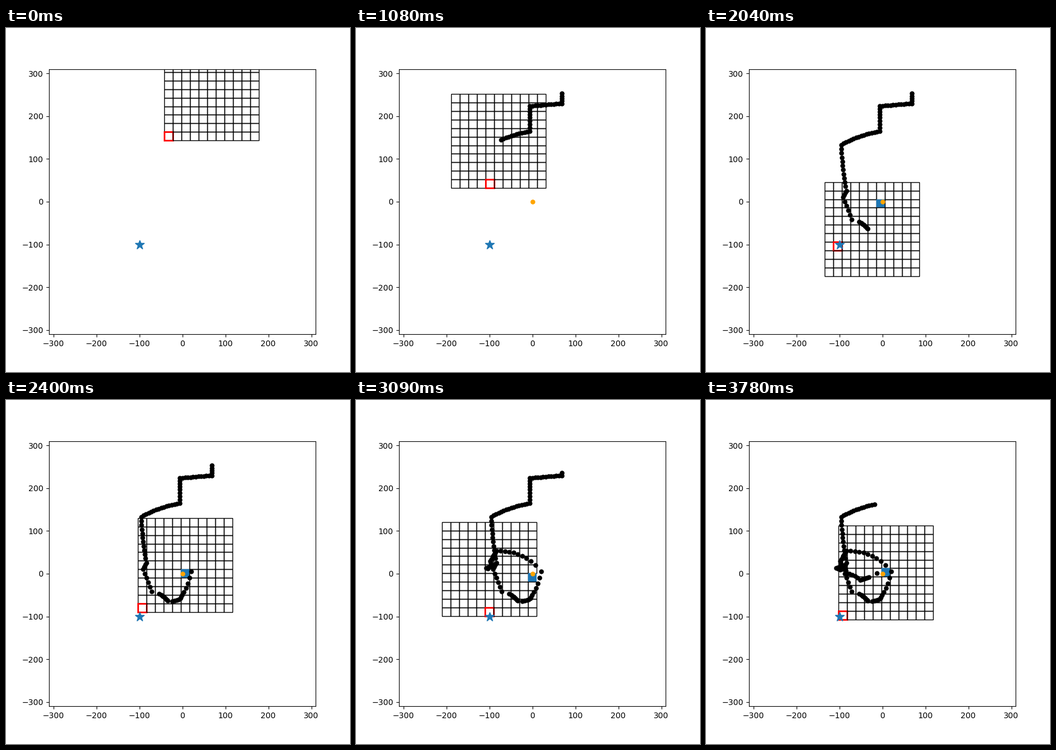
A matplotlib script for the animation above (3.81 s loop, 600 by 600 pixels).

```python
import matplotlib.pyplot as plt
import numpy as np
from matplotlib.animation import FuncAnimation
from matplotlib.patches import Rectangle

FRAMES = 127
CELL = 20
SIDE = 11
HALF = CELL * SIDE / 2
TRAIL = 100
START = np.array([68, 253.4])
GOAL = np.array([-100, -100])
OBSTACLE = np.array([0, 0])


def leg(start, steps, x, y, bend=0, pace=1):
    """Arc from start to (x, y); bend bulges to the left, pace eases."""
    s = ((np.arange(steps) + 1) / steps)[:, None] ** pace
    dx, dy = x - start[0], y - start[1]
    bulge = 4 * s * (1 - s) * bend
    return start + s * [dx, dy] + bulge * [-dy, dx]


def walk():
    path = START[None, :]

    def go(*args, **kwargs):
        nonlocal path
        path = np.vstack([path, leg(path[-1], *args, **kwargs)])

    # Approach in a staircase
    go(4, 68, 230)
    go(12, -5.4, 224)
    go(8, -6, 165.4, pace=1.1)
    go(15, -95.7, 133.4, bend=-0.04)
    go(11, -83.7, 26, bend=-0.02)
    # Loop around the obstacle
    go(3, -92, 11.2)
    go(5, -70.7, -41.8)
    go(9, -34.6, -63, bend=0.1, pace=0.4)
    go(5, -5.3, -57.5, bend=-0.11, pace=0.65)
    go(7, 20.7, 5.9, bend=-0.05, pace=1.64)
    go(10, -84, 53.5, bend=-0.125, pace=0.8)
    # Hesitate, then turn back inwards
    go(6, -97.4, 30)
    go(3, -94.6, 18)
    go(3, -108, 14)
    go(5, -94.6, 19.3, bend=-0.4)
    go(2, -98.6, 10)
    go(3, -88, 18)
    go(3, -84, 0.5)
    go(5, -52, -14.3, bend=0.1)
    go(5, -32, -7.5)
    go(2, 8, 2.8, bend=0.1)
    return path


path = walk()

fig, ax = plt.subplots(figsize=(6, 6), dpi=100)
ax.set_xlim(-310, 310)
ax.set_ylim(-310, 310)

cells = {}
for col in range(SIDE):
    for row in reversed(range(SIDE)):
        cells[col, row] = ax.add_patch(Rectangle((0, 0), CELL, CELL))

ax.plot(*GOAL, "*", color="tab:blue", markersize=12)
trail, = ax.plot([], [], "o", color="black", markersize=5)
obstacle, = ax.plot([], [], "o", color="orange", markersize=5)


def cell_of(point, corner):
    return np.floor((point - corner) / CELL).astype(int)


def update(n):
    corner = path[n] - HALF
    goal_cell = tuple(np.clip(cell_of(GOAL, corner), 0, SIDE - 1))
    blocked = tuple(cell_of(OBSTACLE, corner))
    for key, cell in cells.items():
        cell.set_xy(corner + CELL * np.array(key))
        if key == blocked:
            cell.set(facecolor="tab:blue", edgecolor="none", linewidth=1)
        elif key == goal_cell:
            cell.set(facecolor="none", edgecolor="red", linewidth=2)
        else:
            cell.set(facecolor="none", edgecolor="black", linewidth=1)
    past = path[max(0, n - TRAIL):n]
    trail.set_data(past[:, 0], past[:, 1])
    # The obstacle shows up after the first step
    obstacle.set_data(*([[v] for v in OBSTACLE] if n else ([], [])))
    return [*cells.values(), trail, obstacle]


anim = FuncAnimation(fig, update, frames=FRAMES, interval=30,
                     init_func=lambda: update(0), repeat=True,
                     repeat_delay=0, blit=False)
plt.show()
```
